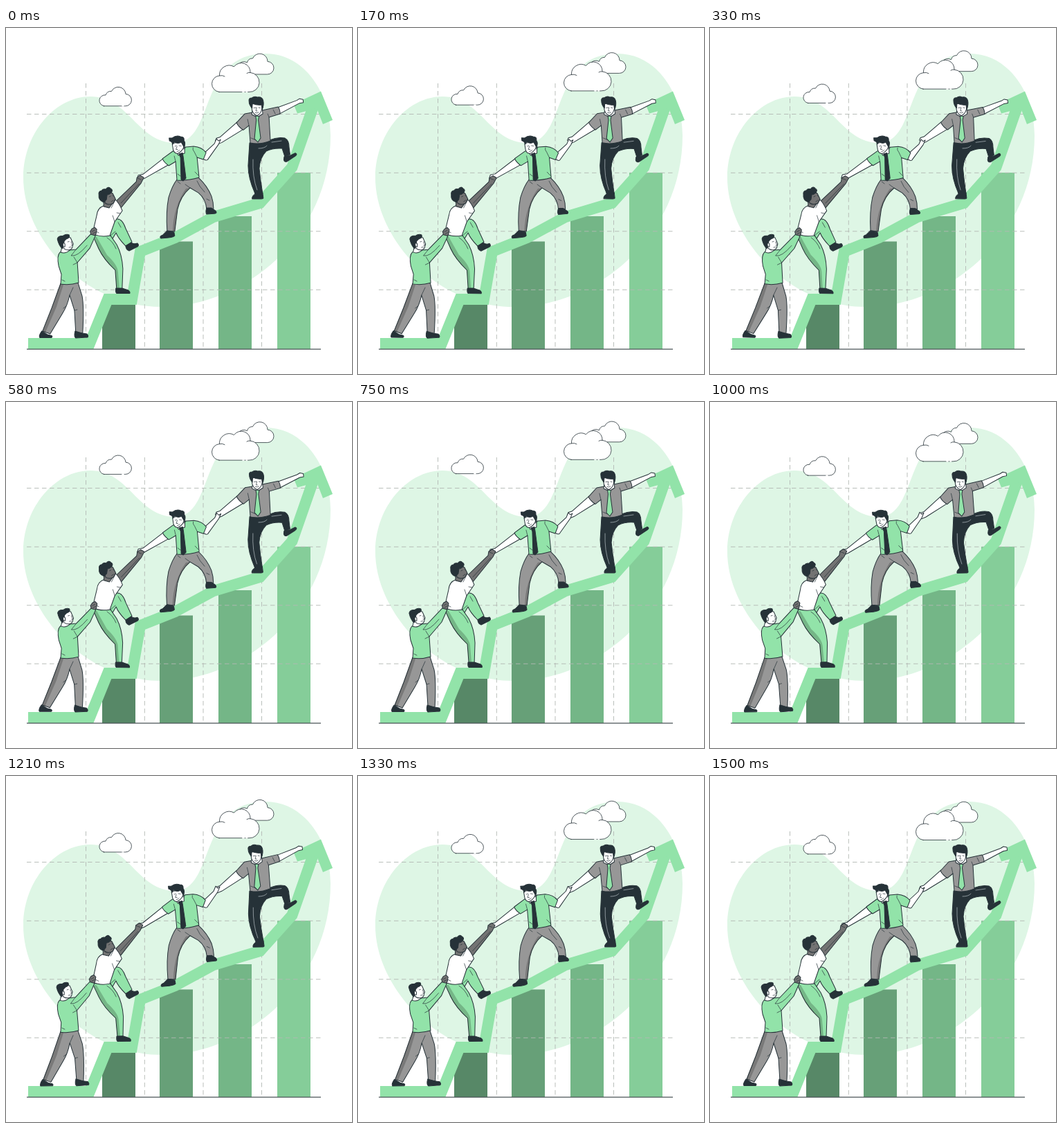
An HTML page for the animation above (1540 ms loop, 500 by 500 pixels).

```html
<!DOCTYPE html>
<html lang="en">
<head>
<meta charset="utf-8">
<title>Climbing the chart</title>
<style>
  html, body { margin: 0; width: 100%; height: 100%; overflow: hidden; background: #fff; }
  svg { display: block; width: 100%; height: 100%; }
  .man path, .cloud path { stroke: #263238; stroke-width: 1; stroke-linejoin: round; stroke-linecap: round; }
  .cloud path { fill: #fff; stroke-width: .8; }
  .grid { fill: none; stroke: #b3b8b4; stroke-width: .9; stroke-dasharray: 6.5 4.5; }
  .trend { fill: none; stroke: #92e3a9; stroke-width: 16; stroke-miterlimit: 10; }
  .man .line { fill: none; stroke-width: .7; }
  .man .shade { fill: #000; fill-opacity: .2; stroke: none; }
  .man .seam { fill: none; stroke: #cfd8dc; stroke-width: .6; }
  .skin { fill: #fff; }
  .dusk { fill: #737373; }
  .green { fill: #92e3a9; }
  .grey { fill: #979797; }
  .dark { fill: #263238; }
</style>
</head>
<body>
<svg viewBox="0 0 500 500">
  <path fill="#def6e5" d="M25 215C26 150 72 99 122 99C178 99 190 166 244 166C303 166 276 37 375 37C432 37 469 95 469 155C469 300 345 403 225 403C110 403 24 300 25 215Z"/>

  <g id="bars"></g>
  <path class="grid" d="M30 124.500H456M30 209.300H456M30 293.800H456M30 378.300H456M115.500 80V464M200.300 80V464M285 80V464M369.500 80V464"/>
  <path class="trend" d="M32 456H121L147 392H182L194 323L244.500 303L300 273L367 253L413.500 201L447 105"/>
  <path class="green" d="M415.500 110L455 91.500L472 133L458 139L449 116L421 123.500Z"/>
  <path d="M30 464.200H455" stroke="#4a5457" stroke-width="1.200"/>

  <g class="cloud">
    <path d="M339 67H377.500A9.200 9.200 0 0 0 378 48.500A11.200 11.200 0 0 0 356.500 44A8 8 0 0 0 348.500 50A9 9 0 0 0 339 67Z"/>
    <path d="M308 92.500H351A14 14 0 0 0 353 64.500A13 13 0 0 0 329.500 56A14 14 0 0 0 308.500 69A11.800 11.800 0 0 0 308 92.500Z"/>
    <path d="M308.500 69Q313 68 316 70M353 64.500Q350 64 348 65.500"/>
    <path d="M141.500 112.800H172.500A8.500 8.500 0 0 0 173 95.500A10.800 10.800 0 0 0 152.500 91.500A7.500 7.500 0 0 0 144 97A8 8 0 0 0 141.500 112.800Z"/>
    <path d="M342 92.500H344M347 92.500H348.500M168 112.800H170" style="stroke:#fff;stroke-width:1.600"/>
  </g>

  <g class="man" data-pivot="367 173">
    <path class="skin" d="M334 136L309 158L304 159.500L302.500 163L306 168L312 165.500L342 147Z"/>
    <path class="skin" d="M392 115L420 104.500L424 102L429 103L429.500 107.500L424 108.500L395 124Z"/>
    <path class="dark" d="M352 166L381 162Q392 157 403 159Q409 162 409 172L410.500 183L403 186L399 174Q386 173 376 178Q367 187 366 203Q368 222 371 239H360Q350 217 350 199Z"/>
    <path class="seam" d="M357 190Q356 215 363 234M384 165L398 163M365 174Q374 174 377 170"/>
    <path class="dark" d="M402 186L411 184L418 180.500Q422 182 418 185L406 193Q402 194 401.500 190Z"/>
    <path class="dark" d="M360 238H371L372 245.500Q372 247 369 247H356Q355 244 360 240Z"/>
    <path class="grey" d="M345 124L356 122L370 119L393 114Q396 118 396 124L380 129L382 163Q367 169 353 166L351 141L343 147.500Q336 143 333 137Z"/>
    <path class="line" d="M351 141L349 132M380 129L378 124M354 159L361 162M386 118L389 124"/>
    <path class="skin" d="M356 119L355 125L363 129L371 124L370 117Z"/>
    <path class="green" d="M360.500 127L365.500 127.500L364.500 133L368 159L364 165L359 160L361.500 133Z"/>
    <path class="skin" d="M354 110L355.500 119Q358 126 363 126.500Q369 124 370.500 113L370 108Z"/>
    <path class="dark" d="M351 106Q350 101 355 101Q359 98 363 100Q370 99 371.500 105Q373 111 370 118L369 111Q362 112 356 109L355.500 116Q351 111 351 106Z"/>
    <path class="line" d="M358 115.500L361 115M365 115L367 115.500M362 115L361 120H363M360 122.500Q363 123.500 365 122"/>
  </g>

  <g class="man" data-pivot="250 230">
    <path class="skin" d="M228 188L198 211.500L191 213L189.500 218L194 220L200 217.500L236 197Z"/>
    <path class="skin" d="M287 180L301 167L304 160L307 163L310 161L307 168L291 190.500Q288 192 284 188Z"/>
    <path class="grey" d="M247 219L278 216Q291 228 297 243Q300 252 300 261L290 262Q289 247 278 238L266 231Q252 243 248 262L244 294L233 293Q231 266 235 245Q240 228 247 219Z"/>
    <path class="shade" d="M266 231Q252 243 248 262L244 294L241 294Q242 258 260 232Z"/>
    <path class="line" d="M266 231L259 226M276 221Q279 229 287 237M290 247L294 249M248 222L252 225"/>
    <path class="dark" d="M233 293L243 295L244 300Q243 302 235 303L224 304Q221 301 227 299Z"/>
    <path class="dark" d="M290 260L297 260L303 264Q306 268 301 268L290 269Q288 266 290 260Z"/>
    <path class="green" d="M241 178L249 176L260 172L271 171Q283 172 289 180L285 190L276 187L279 216Q263 221 247 220L245 193L235 199Q228 194 226 189Z"/>
    <path class="line" d="M245 193L243 185M276 187L272 179Q269 176 270 173M248 211L252 214M273 208L278 213"/>
    <path class="skin" d="M245 177L249 184L258 181L258 173Z"/>
    <path class="dark" d="M250 182L255 180.500L256 186L260 217L256 221L253 219L252 187Z"/>
    <path class="skin" d="M240 167L241.500 176Q243 181.500 248 181.500Q254 179 258 170L255 163Z"/>
    <path class="dark" d="M235.500 159L240 159Q246 154.500 252 157Q258 157 257 162.500Q260 167 257 172L253 165Q248 168 243 164.500L241 168Q240 164 236 163Z"/>
    <path class="line" d="M244 171L246 170M250 170L253 170.500M247 171L245.500 175.500H248M247 178.500Q250 178 251 176.500M256 172Q259 169 259 173Q258 176 256 175"/>
  </g>

  <g class="man" data-pivot="158 307">
    <path class="dusk" d="M159 250L188 222L189 216L194 213L199 216L195 224L166 260Z"/>
    <path class="line" d="M166 253L192 225M190 217L195 219"/>
    <path class="green" d="M148 300Q152 281 160 276Q168 275 173 290L182 309L173 315Q162 304 159 296L153 306Z"/>
    <path class="dark" d="M173 315L181 310Q185 313 190 311Q193 314 190 316L178 322Q173 320 173 315Z"/>
    <path class="green" d="M125 299L151 300L160 313Q168 328 169 348L168 377H160L158 350Q141 334 134 319Z"/>
    <path class="shade" d="M127 301L131 302L146 328Q161 342 162 352L164 377H160L158 350Q141 334 134 319Z"/>
    <path class="line" d="M151 300L158 294M146 303Q155 309 159 319M162 281L166 288"/>
    <path class="dark" d="M159 376H168L177 379Q180 381 179 383.500H160Q158 381 159 376Z"/>
    <path class="skin" d="M141 257Q132 260 131 271L125 297Q136 303 150 300L157 280L168 264Q164 254 158 248L151 254Z"/>
    <path class="line" d="M157 280L154 271M158 248L152 260M128 293L134 296M160 267L165 268"/>
    <path class="dusk" d="M141 251L141 258L149 260L154 253Z"/>
    <path class="dusk" d="M142 242L143 253Q149 257 155 253L158 247L154 239Q148 236 142 242Z"/>
    <path class="dark" d="M134 241Q133 236 138 235Q140 232 144 233Q148 228 151 232Q155 234 152 238Q149 241 146 241L145 248L141 252Q133 249 134 241Z"/>
    <path class="line" d="M149 244L151 243M154 242L155 243M152 251L155 249"/>
  </g>

  <g class="man" data-pivot="89 373">
    <path class="grey" d="M79 369L104 368L110 387Q113 402 111 441H101L99 408L92 386Q89 401 82 412L64 442L53 438L66 405Z"/>
    <path class="shade" d="M79 369L83 371L73 403L57 440L53 438L66 405Z"/>
    <path class="line" d="M92 386L97 375M87 402L83 405M99 408L103 407"/>
    <path class="dark" d="M52 438L60 443L66 444.500Q68 446 66 447.500H49Q47 445 52 438Z"/>
    <path class="dark" d="M100 438L110 441L117 442Q120 445 118 447L101 448Q98 446 100 438Z"/>
    <path class="dusk" d="M123 300L121.500 294L124 290L128 288L131 291L130 297L127 303Z"/>
    <path class="green" d="M78 324Q73 329 76 344L80 356L79 370Q92 372 105 368L103 339L121 318L129 300L122 298L101 320L92 321Z"/>
    <path class="line" d="M103 339L98 331M103 339L97 342M101 320L94 329Q103 331 117 314M81 364L85 366"/>
    <path class="skin" d="M81 315L79 324Q85 327 92 321L91 317Z"/>
    <path class="skin" d="M81 309L82 317Q86 322 92 320.500Q96 319 96 315L97 312L93 303Q87 301 81 309Z"/>
    <path class="dark" d="M74 305Q75 300 82 300.500Q87 297 91 299Q93 303 87 305L84 308L83 315L81 319Q76 314 74 305Z"/>
    <path class="skin" d="M85 312Q82 309 82 313Q82 317 85 316Z"/>
    <path class="line" d="M89 309L91 308.500M94 309L95 309M94 310L96.500 314H94M91 317L94 316.500"/>
    <path class="line" d="M124 294L128 292M125 297L129 295"/>
  </g>
</svg>
<script>
  const LOOP = 1540, LEAD = 40;
  const bars = [[139, 400, '#578867'], [222, 308.5, '#67a078'], [307, 272, '#74b687'], [392, 209, '#85cd99']];
  document.getElementById('bars').innerHTML = bars.map(([x, y, fill]) =>
    `<rect x="${x}" y="${y}" width="48" height="${464 - y}" fill="${fill}"/>`).join('');

  const clouds = document.querySelector('.cloud');
  const men = document.querySelectorAll('.man');

  function draw(now) {
    const phase = (now + LEAD) / LOOP * 2 * Math.PI;
    const lift = 4.6 * (Math.cos(phase) - 1);
    const tilt = 0.9 * Math.sin(phase);
    clouds.setAttribute('transform', `translate(0 ${lift})`);
    for (const man of men) man.setAttribute('transform', `rotate(${tilt} ${man.dataset.pivot})`);
  }

  function tick() {
    draw(performance.now() % LOOP);
    requestAnimationFrame(tick);
  }
  tick();
</script>
</body>
</html>
```
